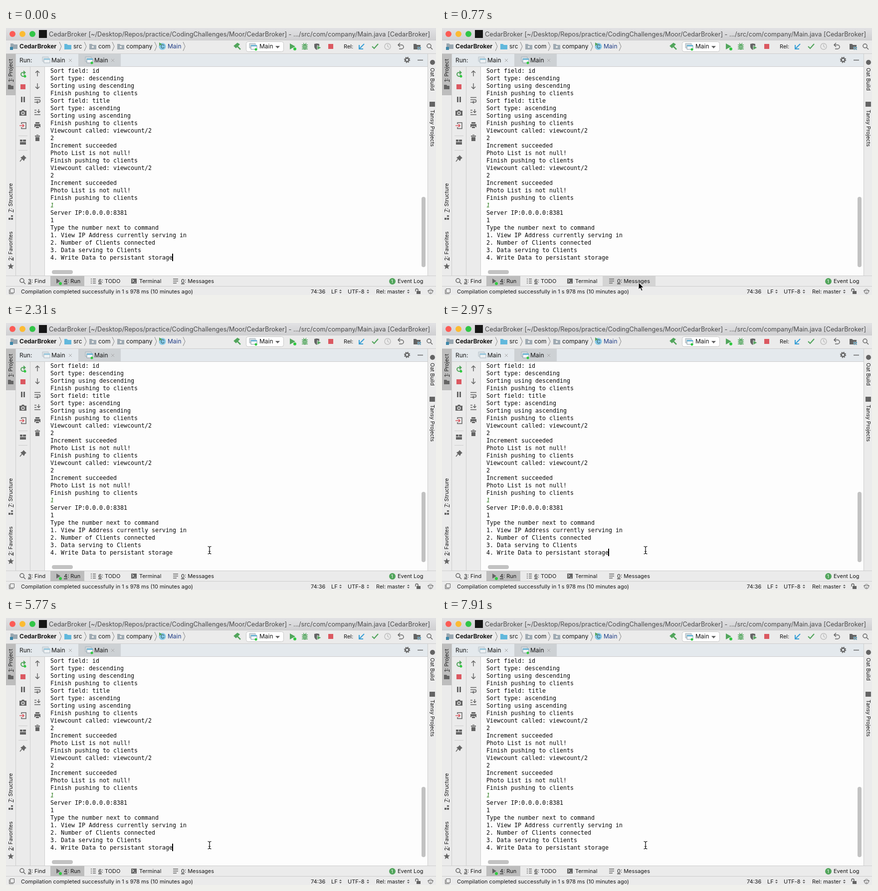
An HTML page that plays this animation: 862 by 536 pixels, repeating every 8000 ms.

```html
<!DOCTYPE html>
<html lang="en">
<head>
<meta charset="utf-8">
<title>Run console</title>
<style>
html, body { margin: 0; width: 100%; height: 100%; overflow: hidden; background: #ebebeb; }
svg { display: block; width: 862px; height: 536px; }
text { font: 10.95px Inter, "Open Sans", sans-serif; fill: #161616; white-space: pre; }
.big { font-size: 12px; }
.title { font-size: 12.7px; fill: #4b4b4b; }
.bold { font-weight: 700; }
.side { font-size: 10.7px; }
.u { text-decoration: underline; }
#console text { font: 11.63px "DejaVu Sans Mono", monospace; fill: #080808; }
#console .input { font-style: italic; fill: #2f7d1f; }
.ln { fill: none; stroke: #646464; stroke-width: 1.5; }
.edge { fill: none; stroke: #cdcdcd; stroke-width: 1; }
.ink { fill: #646464; }
.green { fill: #52a55c; }
.red { fill: #db5860; }
.dot { fill: #2fc93f; }
.thumb { fill: #c2c2c2; }
.picked { fill: #bdbdbd; }
</style>
</head>
<body>
<svg viewBox="0 0 862 536">
  <defs>
    <linearGradient id="bar" x2="0" y2="1">
      <stop stop-color="#e2e2e4"/><stop offset="1" stop-color="#d0d0d2"/>
    </linearGradient>
    <path id="folder" d="M0 0h5l2 2h7v9H0z"/>
    <path id="chevron" class="ln" d="M0-9 4 0 0 9" style="stroke:#858585;stroke-width:1"/>
    <g id="app">
      <path d="M0 0h12v9H0z" fill="#d5dce0" stroke="#a3b0b8"/>
      <path d="M3 4h12v8H3z" fill="#f4f7f9" stroke="#8799a3"/>
      <path d="M3 3h12v3H3z" fill="#6fb6d6"/>
    </g>
    <path id="close" d="M-3-3 3 3M3-3-3 3" fill="none" stroke="#a8a8a8"/>
    <path id="lens" class="ln" d="M4 0A4 4 0 1 1-4 0 4 4 0 1 1 4 0M3 3 7 7"/>
    <g id="sort" class="ink"><path d="M0-1 2.500-4 5-1zM0 1 2.500 4 5 1z"/></g>
    <path id="play" class="green" d="M0-6 11 0 0 6z"/>
    <path id="rows" class="ln" d="M0-4H10M0 0H10M0 4H7"/>
  </defs>

  <rect width="862" height="536" fill="#ebebeb"/>
  <rect width="862" height="24" fill="url(#bar)"/>
  <path class="edge" d="M0 24.500H862"/>

  <!-- title bar -->
  <circle cx="13" cy="12" r="6" fill="#fc5b55"/>
  <circle cx="33" cy="12" r="6" fill="#fcbb32"/>
  <circle cx="53" cy="12" r="6" fill="#31c546"/>
  <rect x="66" y="4" width="16" height="16" fill="#161616"/>
  <text class="title" x="86" y="17">CedarBroker [~/Desktop/Repos/practice/CodingChallenges/Moor/CedarBroker] - .../src/com/company/Main.java [CedarBroker]</text>

  <!-- navigation bar -->
  <use href="#folder" x="9" y="31" fill="#9aa7b0"/>
  <rect x="8" y="38" width="6" height="6" fill="#3d87a8"/>
  <use href="#folder" x="117" y="32" fill="#62b8dc"/>
  <use href="#folder" x="167" y="32" fill="#a0abb3"/>
  <use href="#folder" x="223" y="32" fill="#a0abb3"/>
  <circle cx="174" cy="38" r="2" fill="#f0f0f0"/>
  <circle cx="230" cy="38" r="2" fill="#f0f0f0"/>
  <use href="#chevron" x="107" y="37"/><use href="#chevron" x="157" y="37"/>
  <use href="#chevron" x="213" y="37"/><use href="#chevron" x="298" y="37"/>
  <use href="#chevron" x="355" y="37"/>
  <circle cx="313.500" cy="37" r="7" fill="#86c8e6"/>
  <text x="310" y="41" style="fill:#31545c">C</text>
  <path class="green" d="m307 29 6 3.500-6 3.500z"/>
  <text class="big bold" x="27" y="41">CedarBroker</text>
  <text class="big" x="135" y="41">src</text>
  <text class="big" x="185" y="41">com</text>
  <text class="big" x="241" y="41">company</text>
  <text class="big" x="324" y="41" style="fill:#203d86">Main</text>
  <path d="m463 36 7 7M458 36l6-5 3 2-6 6z" fill="#52a55c" stroke="#52a55c" stroke-width="2.500"/>
  <rect x="481.500" y="27.500" width="75" height="20" rx="4" fill="#fff" stroke="#c6c6c6"/>
  <use href="#app" x="488" y="31"/><circle class="dot" cx="501" cy="43" r="2.500"/>
  <text class="big" x="508" y="41">Main</text>
  <path class="ink" d="M540 36h9l-4.500 5z"/>
  <use href="#play" x="569" y="37"/><circle class="dot" cx="579" cy="42" r="3"/>
  <ellipse class="green" cx="599" cy="38" rx="4" ry="5.500"/>
  <path d="M593 34h12M593 38h12M593 42h12M596 30l2 3M602 30l-2 3" fill="none" stroke="#52a55c" stroke-width="1.300"/>
  <path d="M596 36.500h6M596 40h6" stroke="#ebebeb"/>
  <path class="ink" d="M618 32l5-1 5 1v6q-1 4-5 6-4-2-5-6z"/>
  <path class="green" d="m624 35 8 4.500-8 4.500z" stroke="#ebebeb"/>
  <rect class="red" x="646" y="32" width="10" height="10"/>
  <text x="677" y="41">Rel:</text>
  <path d="m718 32-9 9M708 34v8h8" fill="none" stroke="#389fd6" stroke-width="2"/>
  <path d="m734 37 4 4 8-9" fill="none" stroke="#52a55c" stroke-width="2.200"/>
  <path d="M771 37a6 6 0 1 1-12 0 6 6 0 1 1 12 0M765 33v4l3 2" fill="none" stroke="#bcbcbc" stroke-width="1.400"/>
  <path class="ln" d="M787 34h6a4 4 0 0 1 0 8h-5M790 30l-4 4 4 4"/>
  <use href="#folder" x="817" y="32" class="ink"/>
  <path d="M825 38h3v3h-3zM829 38h3v3h-3zM825 42h3v2h-3zM829 42h3v2h-3z" fill="#3987a8" stroke="#ebebeb" stroke-width=".5"/>
  <use href="#lens" x="848" y="36"/>

  <!-- run header -->
  <rect x="20" y="52" width="825" height="25" fill="#e4e9ed"/>
  <path class="edge" d="M0 51.500H862M20 77.500H845"/>
  <rect x="145" y="52" width="85" height="25" fill="#cdd1d4"/>
  <text class="big" x="27" y="69">Run:</text>
  <g opacity=".65"><use href="#app" x="73" y="58"/></g>
  <text class="big" x="91" y="69">Main</text><use href="#close" x="129" y="65"/>
  <use href="#app" x="159" y="58"/><circle class="dot" cx="172" cy="70" r="2.500"/>
  <text class="big" x="177" y="69">Main</text><use href="#close" x="214" y="65"/>
  <circle cx="804" cy="64" r="3.500" fill="none" stroke="#646464" stroke-width="2.400"/>
  <circle cx="804" cy="64" r="5.300" fill="none" stroke="#646464" stroke-width="1.800" stroke-dasharray="2.080"/>
  <path class="ln" d="M825 64.500h11"/>

  <!-- left stripe -->
  <rect class="picked" y="52" width="19" height="83"/>
  <path class="edge" d="M19.500 52V497M48.500 78V497M77.500 78V497M845.500 52V497"/>
  <text class="side" transform="translate(13 108) rotate(-90)"><tspan class="u">1</tspan>: Project</text>
  <path class="ink" d="M4 114h5l1.500 2H15v7H4z"/>
  <text class="side" transform="translate(13 370) rotate(-90)"><tspan class="u">7</tspan>: Structure</text>
  <path class="ink" d="M10 376h4v3h-4zM5 381h4v4H5zM10 381h4v4h-4z"/>
  <text class="side" transform="translate(13 467) rotate(-90)"><tspan class="u">2</tspan>: Favorites</text>
  <path class="ink" d="m9.500 472 1.700 4.300 4.600.3-3.600 3 1.200 4.400-3.900-2.500-3.900 2.500 1.200-4.400-3.600-3 4.600-.3z"/>

  <!-- console tools -->
  <path d="M38 89.500h-6a4 4 0 1 0 6 4" fill="none" stroke="#52a55c" stroke-width="2"/>
  <path class="green" d="m35 85 5 4.500-5 4.500z"/><circle class="dot" cx="38" cy="97" r="2.500"/>
  <rect class="red" x="29" y="113" width="10" height="10"/>
  <path class="ink" d="M30 138h3v11h-3zM35 138h3v11h-3z"/>
  <path class="ink" d="M27 166h4l1-2h4l1 2h4v10H27z"/>
  <circle cx="34" cy="171" r="2.800" fill="#646464" stroke="#ebebeb" stroke-width="1.400"/>
  <path class="ln" d="M31 193v-3h9v12h-9v-3"/>
  <path d="M27 196h9m-3-3 3 3-3 3" fill="none" stroke="#db5860" stroke-width="1.700"/>
  <path class="edge" d="M25 216.500H43M25 245.500H43"/>
  <path class="ink" d="M28 224h5v4h-5zM34 224h6v4h-6zM28 229h12v5H28z"/>
  <path class="ink" d="m35 255 6 6-2 1-1 1-2 4-7-7 4-2 1-1z"/><path class="ln" d="m32 263-4 5"/>
  <path class="ln" d="M63 97V86m-4 4 4-4 4 4M63 111v11m-4-4 4 4 4-4"/>
  <path class="ln" d="M57 139.500h12M57 144h9a2.500 2.500 0 0 1 0 5h-4M57 149h3m4-2.500-3 2.500 3 2.500"/>
  <path class="ln" d="M57 174h12M57 165h4M57 169.500h4M65.500 163v7m-3-3 3 3 3-3"/>
  <path class="ink" d="M59 189h8v3h-8zM57 193h12v6h-2v-2h-8v2h-2zM60 198h6v3h-6z"/>
  <path class="ink" d="M58 216h10v2H58zM61 214h4v1h-4zM59 219h8v8h-8z"/>

  <!-- console -->
  <rect x="78" y="78" width="767" height="419" fill="#fdfdfd"/>
  <g id="console"></g>
  <rect class="thumb" x="833" y="339" width="8" height="141" rx="4"/>
  <rect class="thumb" x="92" y="486" width="42" height="8" rx="4"/>
  <rect id="caret" x="333" y="453" width="2" height="15"/>

  <!-- right stripe -->
  <circle class="ink" cx="855" cy="69" r="5"/>
  <text class="side" transform="translate(851 80) rotate(90)">Oat Build</text>
  <rect class="ink" x="849" y="148" width="11" height="10"/>
  <text class="side" transform="translate(851 164) rotate(90)">Tansy Projects</text>

  <!-- bottom stripe -->
  <path class="edge" d="M0 497.500H862M0 518.500H862"/>
  <rect class="picked" x="89" y="498" width="68" height="20"/>
  <rect id="hover" x="322" y="498" width="106" height="20" fill="#d4d4d4"/>
  <use href="#lens" x="32" y="507"/>
  <text x="44" y="512"><tspan class="u">3</tspan>: Find</text>
  <path class="ink" d="m101 503 8 5-8 5z"/><circle class="dot" cx="109" cy="513" r="3"/>
  <text x="116" y="512"><tspan class="u">4</tspan>: Run</text>
  <path class="ln" d="M170 504h2m2 0h6M170 508h2m2 0h6M170 512h2m2 0h6"/>
  <text x="185" y="512"><tspan class="u">6</tspan>: TODO</text>
  <rect class="ink" x="251" y="503" width="11" height="10"/>
  <path d="m253 505 3 2.500-3 2.500M257 511h3" fill="none" stroke="#ebebeb" stroke-width="1.200"/>
  <text x="267" y="512">Terminal</text>
  <use href="#rows" x="335" y="508"/>
  <text x="351" y="512"><tspan class="u">0</tspan>: Messages</text>
  <circle class="green" cx="774.500" cy="508.500" r="6.500"/>
  <text x="772" y="512" style="fill:#fff;font-size:9.500px">1</text>
  <text x="785" y="512">Event Log</text>

  <!-- status bar -->
  <path class="ln" d="M8.500 523.500h8v8h-8zM6.500 525v8.500H15" style="stroke-width:1"/>
  <text x="30" y="533">Compilation completed successfully in 1 s 978 ms (10 minutes ago)</text>
  <text x="611" y="533">74:36</text>
  <text x="652" y="533">LF</text><use href="#sort" x="668" y="529"/>
  <text x="685" y="533">UTF-8</text><use href="#sort" x="723" y="529"/>
  <text x="742" y="533">Rel: master</text><use href="#sort" x="804" y="529"/>
  <path class="ink" d="M823 528h8v6h-8z"/><path class="ln" d="M821 529v-3a2.500 2.500 0 0 1 5 0v2"/>
  <circle class="ln" cx="851" cy="529" r="4.500" style="stroke-width:1"/><path class="ln" d="M845 527.500h12M849 531.500h4" style="stroke-width:1"/>

  <!-- pointers -->
  <g id="arrow"><path d="M0 0V14l3.200-3 2.500 5.700 2.500-1.100-2.500-5.500h4.600z" fill="#000" stroke="#fff" stroke-width="1"/></g>
  <g id="beam"><path d="M-3.500-7.500q3.500 0 3.500 2.500 0-2.500 3.500-2.500M0-5V5M-3.500 7.500Q0 7.500 0 5q0 2.500 3.500 2.500M-2 2.500h4" fill="none" stroke="#000" stroke-width="1.200"/></g>
</svg>
<script>
const LOOP = 8000;
const $ = id => document.getElementById(id);

const push = 'Finish pushing to clients';
const sort = (field, type) => [`Sort field: ${field}`, `Sort type: ${type}`, `Sorting using ${type}`, push];
const view = ['Viewcount called: viewcount/2', '2', 'Increment succeeded', 'Photo List is not null!', push];
const lines = [
  ...sort('id', 'descending'), ...sort('title', 'ascending'), ...view, ...view,
  '1', 'Server IP:0.0.0.0:8381', '1', 'Type the number next to command',
  '1. View IP Address currently serving in', '2. Number of Clients connected',
  '3. Data serving to Clients', '4. Write Data to persistant storage'
];
const inputRow = 18;
$('console').innerHTML = lines.map((line, i) =>
  `<text x="89" y="${90 + i * 15}"${i === inputRow ? ' class="input"' : ''}>${line}</text>`).join('');

const play = (id, frames) => $(id).animate(frames, { duration: LOOP, iterations: Infinity }).startTime = 0;

// Steps are [time, visible]; each holds until the next.
function blink(id, steps) {
  const frames = steps.map(([t, on]) => ({ offset: t / LOOP, opacity: on, easing: 'step-end' }));
  play(id, [...frames, { offset: 1, opacity: steps.at(-1)[1] }]);
}

// Points are [time, x, y], joined by straight moves.
function move(id, points) {
  const at = ([t, x, y]) => ({ offset: t / LOOP, transform: `translate(${x}px, ${y}px)` });
  const first = points[0], last = points.at(-1);
  play(id, [at([0, first[1], first[2]]), ...points.map(at), at([LOOP, last[1], last[2]])]);
}

const caretSteps = [[0, 1]];
for (let t = 420, on = 0; t < LOOP; t += 700, on = 1 - on) caretSteps.push([t, on]);
blink('caret', caretSteps);

// The pointer rises from below the stage and turns into a text beam over the console.
const path = [[420, 376, 540], [770, 394, 511], [1470, 411, 482], [2030, 408, 456]];
const beamStart = 1560;
blink('hover', [[0, 0], [680, 1], [1080, 0]]);
blink('arrow', [[0, 0], [420, 1], [beamStart, 0]]);
blink('beam', [[0, 0], [beamStart, 1]]);
move('arrow', path);
move('beam', path);
</script>
</body>
</html>
```
